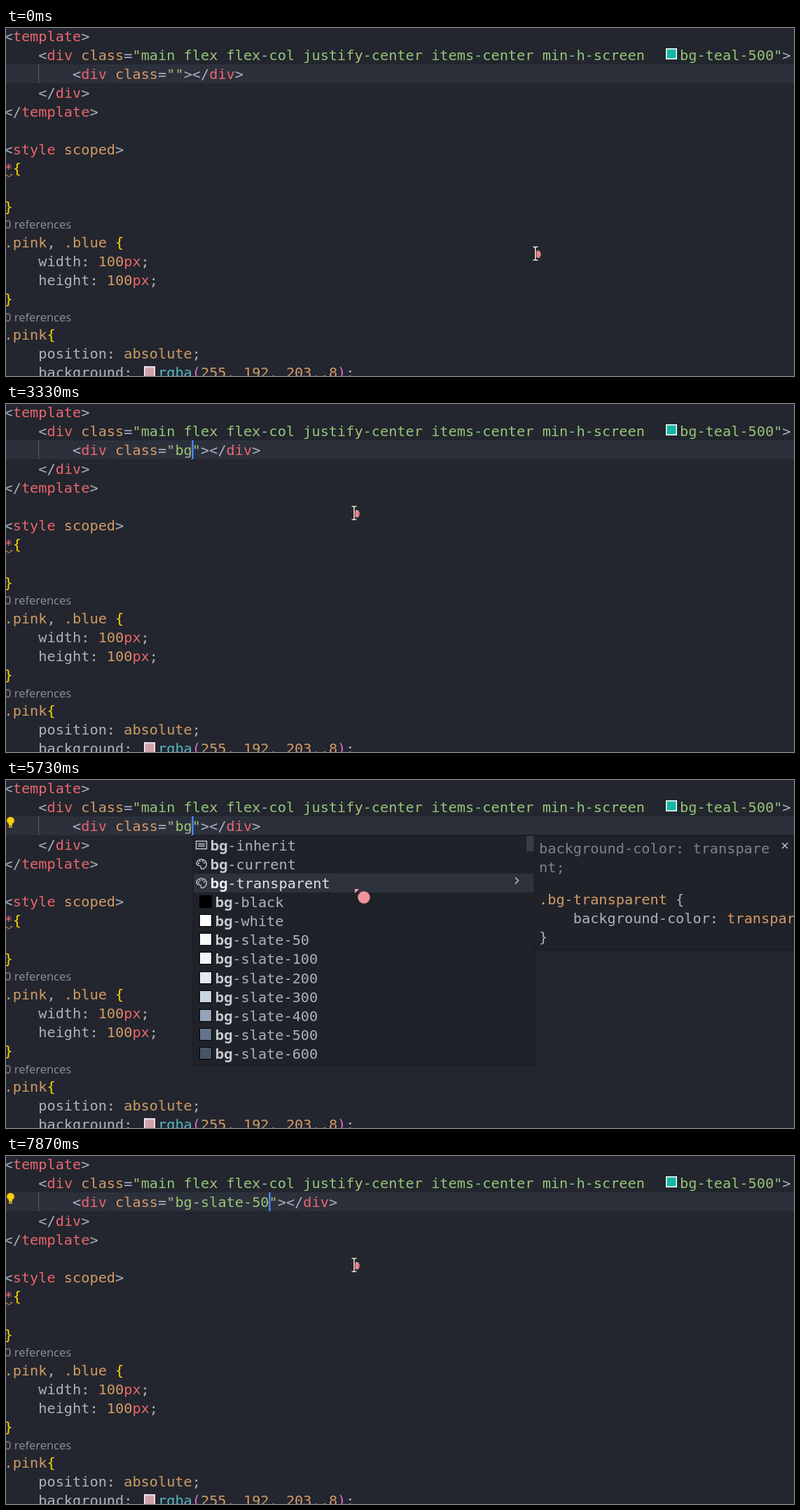
These frames come from a looping animation (1125 px wide and 498 px high, 8 s). An HTML page:

```html
<!DOCTYPE html>
<html lang="en">
<head>
<meta charset="utf-8">
<title>Editor autocomplete</title>
<style>
  html, body { margin: 0; width: 100%; height: 100%; overflow: hidden; background: #23262e; }
  svg { display: block; width: 1125px; height: 498px; }
  text { font: 20.266px "DejaVu Sans Mono", "Noto Sans Mono", monospace; white-space: pre; font-variant-ligatures: none; }
  .sans { font-family: "Open Sans", "Noto Sans", sans-serif; }
  .lens { font-size: 16.5px; fill: #8f9196; }
  .label { font-size: 19.1px; fill: #c0c4cc; }
  .w { fill: #abb2bf; } .r { fill: #e8656f; } .o { fill: #d19a66; } .g { fill: #98c379; }
  .y { fill: #ffd700; } .p { fill: #da70d6; } .c { fill: #56b6c2; } .d { fill: #7c818b; }
  .s { fill: #dfe2e8; } .b { fill: #c6cad1; } .k { fill: #f0f2f6; }
  .b, .k { font-weight: 700; font-family: "Noto Sans Mono", monospace; }
  .icon { fill: none; stroke: #c5c8ce; stroke-width: 1.4; }
</style>
</head>
<body>
<svg viewBox="0 0 1125 498"><g id="page"></g><g id="live"></g></svg>
<script>
const LOOP = 8000, TICK = 1000 / 15;
const CH = 12.2, ROW = 27.14, LEFT = -2.5;
const MENU_TOP = 79.5, PANE_X = 761;

const esc = s => s.replace(/&/g, '&amp;').replace(/</g, '&lt;');
// Each token is a colour class letter followed by its text.
const code = (x, y, ...tokens) => `<text x="${x}" y="${y}">` +
  tokens.map(t => `<tspan class="${t[0]}">${esc(t.slice(1))}</tspan>`).join('') + '</text>';
const sans = (cls, x, y, s) => `<text class="sans ${cls}" x="${x}" y="${y}">${s}</text>`;
const rect = (x, y, w, h, fill, extra = '') =>
  `<rect x="${x}" y="${y}" width="${w}" height="${h}" fill="${fill}" ${extra}/>`;
const dot = (x, y, r, fill) => `<circle cx="${x}" cy="${y}" r="${r}" fill="${fill}"/>`;
const icon = d => `<path class="icon" d="${d}"/>`;
const panel = (x, w, h) => rect(x, 79, w, h, '#1f2229', 'stroke="#191b20"');
const swatch = (x, y, fill) => rect(x + .8, y + .8, 14.4, 14.4, fill, 'stroke="#f4f4f4" stroke-width="1.6"');
const col = n => LEFT + n * CH;
const row = n => 18.5 + n * ROW;
const prop = (y, name, value, unit) => code(col(4), y, 'w' + name + ': ', 'o' + value, 'r' + unit, 'w;');

function page() {
  const a = 314, b = 446;
  return rect(0, 52, 1125, 27, '#2c303b') + rect(46, 52, 1, 27, '#565b67') +
    code(LEFT, row(0), 'w<', 'rtemplate', 'w>') +
    code(col(4), row(1), 'w<', 'rdiv', 'o class', 'w=',
      'g"main flex flex-col justify-center items-center min-h-screen') +
    swatch(942, 29, '#14b8a6') + code(962, row(1), 'gbg-teal-500"', 'w>') +
    code(col(4), row(3), 'w</', 'rdiv', 'w>') +
    code(LEFT, row(4), 'w</', 'rtemplate', 'w>') +
    code(LEFT, row(6), 'w<', 'rstyle', 'o scoped', 'w>') +
    code(LEFT, row(7), 'r*', 'y{') +
    '<path d="M-2 213q2-4 4-1.5t4 0t4-1.5" fill="none" stroke="#c09553" stroke-width="1.2"/>' +
    code(LEFT, row(9), 'y}') +
    sans('lens', -2, 287, '0 references') +
    code(LEFT, a, 'o.pink', 'w, ', 'o.blue', 'y {') +
    prop(a + ROW, 'width', '100', 'px') + prop(a + 2 * ROW, 'height', '100', 'px') +
    code(LEFT, a + 3 * ROW, 'y}') +
    sans('lens', -2, 420, '0 references') +
    code(LEFT, b, 'o.pink', 'y{') +
    prop(b + ROW, 'position', 'absolute', '') +
    code(col(4), b + 2 * ROW, 'wbackground:') + swatch(197, 484, '#d3a3ab') +
    code(217, b + 2 * ROW, 'crgba', 'p(', 'o255', 'w, ', 'o192', 'w, ', 'o203', 'w,', 'o.8', 'p)', 'w;');
}

const colors = {
  inherit: '', current: '', transparent: '', black: '#000', white: '#fff',
  'slate-50': '#f8fafc', 'slate-100': '#f1f5f9', 'slate-200': '#e2e8f0', 'slate-300': '#cbd5e1',
  'slate-400': '#94a3b8', 'slate-500': '#64748b', 'slate-600': '#475569'
};
const names = Object.keys(colors);
const HOVER = 2;

const listIcon = y => icon(`M271.5 ${y - 5.5}h15v11h-15zm2.5 4h10m-10 3h10`);
const paletteIcon = y =>
  icon(`M272 ${y - 1}a7.2 7 0 1 1 8 8.2c-3 0-.5-3.5-3-4.5s-4.5 0-5-3.7z`) +
  [0, 1, 2, 3].map(i => dot(279 - 4 * Math.cos(i), y - 1 - 3.5 * Math.sin(i), 1.1, '#c5c8ce')).join('');

function menu(sel) {
  let out = panel(267, 488, 329.5);
  names.forEach((name, i) => {
    const top = MENU_TOP + i * ROW, mid = top + ROW / 2, on = i === sel, fill = colors[name];
    if (on || i === HOVER) out += rect(268, top, 485.5, ROW, on ? '#2e323d' : '#2b2e38');
    if (fill) out += rect(276.5, Math.round(mid - 9.5) + .5, 17, 17, fill, 'stroke="#000"');
    else out += i ? paletteIcon(mid) : listIcon(mid);
    out += code(fill ? 299 : 292, mid + 7.5, on ? 'kbg' : 'bbg', (on ? 's-' : 'w-') + name);
  });
  out += rect(743, 80, 10.5, 22, '#393d47');
  return sel === HOVER ? out + icon('M727 139.5l4.5 4.5l-4.5 4.5') : out;
}

// Channels of a short or long hex colour
const channels = hex => hex.length < 5 ? channels(hex.replace(/\w/g, '$&$&'))
  : hex.match(/\w\w/g).map(h => parseInt(h, 16));

function pane(sel) {
  const name = names[sel], rgb = colors[name] && channels(colors[name]);
  const value = name === 'current' ? 'currentColor' : name;
  const decl = rgb ? `--tw-bg-opacity: 1; background-color: rgb(${rgb.join(' ')} / var(--tw-bg-opacity));`
    : `background-color: ${value};`;
  const lines = decl.match(/.{1,27}/g).map(s => s.trim());
  const last = 105 + (lines.length - 1) * ROW, y = last + 45.5;
  const out = panel(754.5, 380, last + (rgb ? 57 : 111.5) - 79) +
    lines.map((s, i) => code(PANE_X, 105 + i * ROW, 'd' + s)).join('') +
    icon('M1108 90l8 8m0-8l-8 8');
  if (rgb) return out + sans('label', PANE_X, y, `rgb(${rgb.join(', ')})`);
  return out + code(PANE_X, y, 'o.bg-' + name, 'w {') +
    code(PANE_X + 4 * CH, y + ROW, 'wbackground-color: ', 'o' + value, 'w;') +
    code(PANE_X, y + 2 * ROW, 'w}');
}

const bulb = dot(6.5, 58, 5.3, '#ffcc00') + rect(4, 61, 5, 4.5, '#ffcc00') + rect(4, 66.5, 5, 1.6, '#ffcc00');

// Pointer strokes: start and end time, bend point, end point
const start = [757, 324];
const strokes = [
  [0, 333, [560, 112], [409, 297]],
  [467, 1200, [310, 170], [235, 71]],
  [1267, 1533, [229, 62], [238, 62]],
  [1600, 2133, [330, 62], [497, 156]]
];

function pointerAt(t) {
  let pos = start;
  for (const [t0, t1, bend, end] of strokes) {
    const f = Math.min(1, Math.max(0, (t - t0) / (t1 - t0))), g = 1 - f;
    pos = pos.map((p, i) => g * g * p + 2 * f * g * bend[i] + f * f * end[i]);
  }
  return pos;
}

function beam(t) {
  const d = 'M-3.5-9.5h2.5l1 1l1-1h2.5M0-8.5v17M-3.5 9.5h2.5l1-1l1 1h2.5';
  const line = (color, w) => `<path d="${d}" fill="none" stroke="${color}" stroke-width="${w}"/>`;
  return `<g transform="translate(${pointerAt(t)})"><ellipse cx="4" cy="1" rx="3.8" ry="5.5" fill="#e88089"/>` +
    line('#15171b', 3) + line('#f4f4f4', 1.5) + '</g>';
}
const arrow = '<path d="M498 156h6l-6 6z" fill="#f2a0a6"/>' + dot(511, 168, 8.7, '#f0949c');

const CLICK = 1760, OPEN = 3800, ACCEPT = 7866, BLINK = 500;
const keys = [3200, 3333], arrows = [5533, 5666, 5800, 6066, 6600];
const count = (times, t) => times.filter(x => x <= t).length;

function live(t) {
  const done = t >= ACCEPT, open = t >= OPEN && !done;
  const word = done ? 'bg-slate-50' : 'bg'.slice(0, count(keys, t));
  const reset = [CLICK, ...keys, ACCEPT].filter(x => x <= t).pop();
  let out = code(col(8), row(2), 'w<', 'rdiv', 'o class', 'w=', 'g"' + word + '"', 'w></', 'rdiv', 'w>');
  if (t >= OPEN + TICK) out += bulb;
  if (open) out += menu(count(arrows, t));
  // The description follows the selection one tick later.
  if (open && t >= OPEN + TICK) out += pane(count(arrows, t - TICK));
  if (Math.floor((t - reset) / BLINK) % 2 === 0) out += rect(col(20 + word.length) - .5, 52, 2.3, 27, '#528bff');
  return out + (open ? arrow : beam(t));
}

const layer = document.getElementById('live');
document.getElementById('page').innerHTML = page();
let shown = -1;
function draw() {
  const k = Math.floor((performance.now() + 4) % LOOP / TICK);
  if (k !== shown) {
    shown = k;
    layer.innerHTML = live(k * TICK + 1);
  }
  requestAnimationFrame(draw);
}
draw();
</script>
</body>
</html>
```
